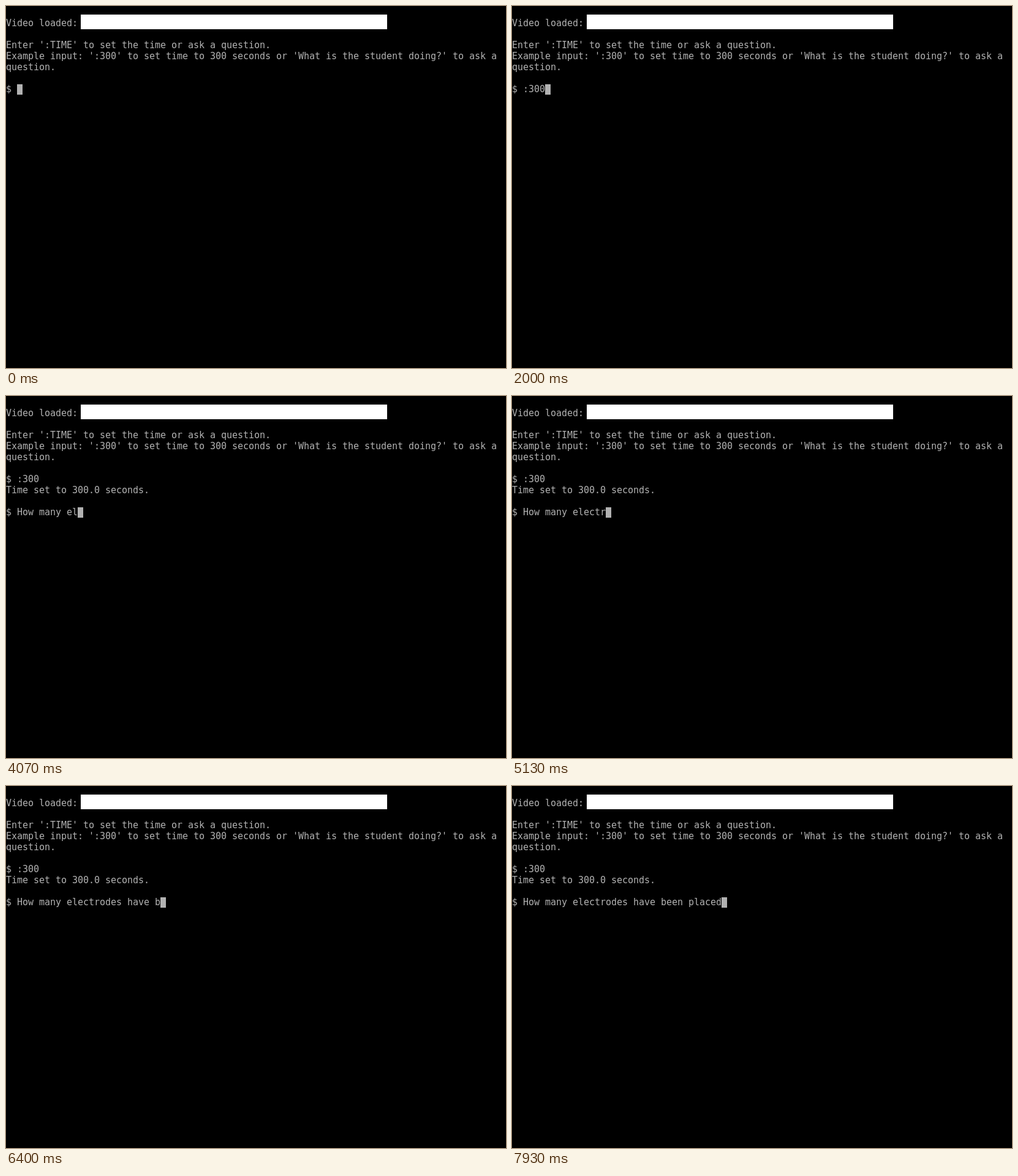
An HTML page for the animation above (8 s loop, 816 by 592 pixels).

```html
<!DOCTYPE html>
<html>
<head>
<meta charset="utf-8">
<style>
html, body { margin: 0; width: 100%; height: 100%; overflow: hidden; background: #000; }
pre {
  position: absolute; left: 0; top: 19px; margin: 0;
  font: 15px/18px "DejaVu Sans Mono", monospace;
  letter-spacing: calc(9px - 1ch); /* snap glyphs to 9px cells */
  color: #b2b2b2;
}
#title { position: absolute; left: 122px; top: 14px; width: 500px; height: 24px; background: #fff; }
#cursor { position: absolute; width: 9px; height: 17px; background: #b2b2b2; }
</style>
</head>
<body>
<pre id="screen"></pre>
<div id="title"></div>
<div id="cursor"></div>
<script>
const LOOP = 8000, CELL = 9, ROW = 18;
const INTRO = `Video loaded:

Enter ':TIME' to set the time or ask a question.
Example input: ':300' to set time to 300 seconds or 'What is the student doing?' to ask a
question.

$ `;
const REPLY = "\nTime set to 300.0 seconds.\n\n$ ";

// Bursts of typing: text, time of the first character, ms per character
const bursts = [
  [INTRO, 0, 0],
  [":300", 1270, 243],
  [REPLY, 2270, 0],
  ["How", 2670, 200],
  [" many ", 3130, 134],
  ["el", 4000, 70],
  ["ectr", 4470, 220],
  ["odes ", 5270, 140],
  ["have b", 5930, 94],
  ["een", 6600, 200],
  [" p", 7000, 70],
  ["lace", 7400, 67],
  ["d", 7870, 0]
];

const screenEl = document.getElementById("screen");
const cursorEl = document.getElementById("cursor");

function typed([text, start, step], t) {
  if (t < start) return "";
  return step ? text.slice(0, 1 + Math.floor((t - start) / step)) : text;
}

function draw(t) {
  const text = bursts.map(b => typed(b, t)).join("");
  const lines = text.split("\n");
  screenEl.textContent = text;
  cursorEl.style.left = lines.at(-1).length * CELL + "px";
  cursorEl.style.top = lines.length * ROW + 2 + "px";
}

const start = performance.now();
function tick() {
  draw((performance.now() - start) % LOOP);
  requestAnimationFrame(tick);
}
tick();
</script>
</body>
</html>
```
